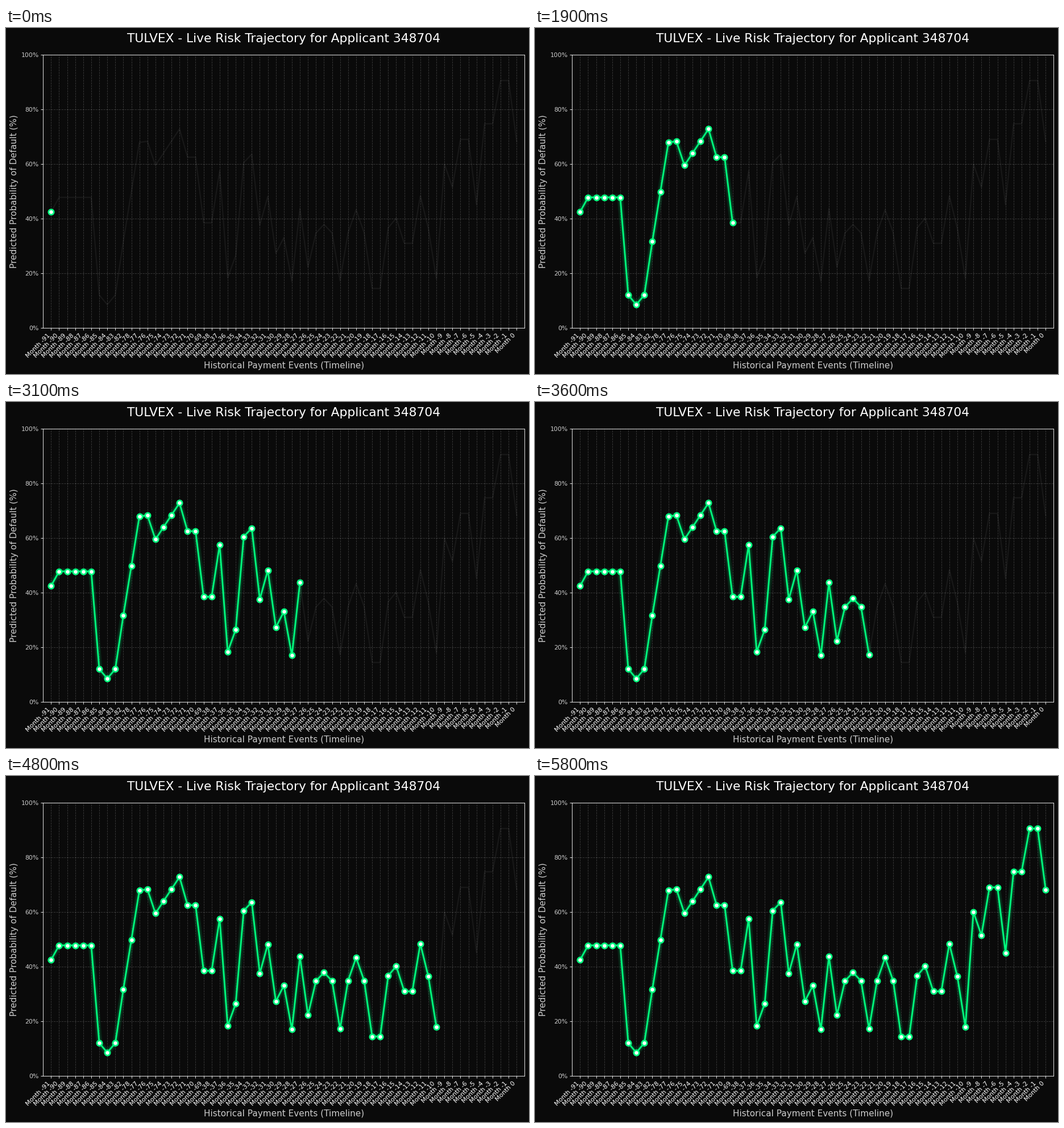
Recreate the animation shown at these times as a matplotlib script. Size 920 by 608 pixels, loop 5820 ms.

```python
import numpy as np
import matplotlib.pyplot as plt
from matplotlib.animation import FuncAnimation
from matplotlib.ticker import PercentFormatter

W, H, DPI = 920, 608, 80
K = 0.978  # scales nominal point sizes to the stage
LEFT, RIGHT, TOP, BOTTOM = 65.2, 912.4, 46.7, 527.4
BG, GREEN, GREY = "#0a0a0a", "#00ff7f", "#cccccc"
TICK_MS, HOLD, FRAMES = 20, 5, 291


def hold(level, n=2):
    return [level] * n


def ramp(start, end, n):
    return list(np.linspace(start, end, n))


def bump(base, tip):
    return [base, tip, base]


def zigzag(lows, highs):
    """Alternate between two trends, beginning and ending on the first."""
    out = np.empty(len(lows) + len(highs))
    out[::2], out[1::2] = lows, highs
    return list(out)


months = [*range(-91, -81), *range(-78, -68), *range(-38, 1)]
early = [42.5, *hold(47.8, 5), *bump(12.1, 8.6), *ramp(31.7, 67.9, 3),
         68.3, *ramp(59.5, 72.8, 4), *hold(62.5)]
middle = [*hold(38.5), 57.5, 18.4, 26.5, 60.5, 63.6,
          *zigzag(ramp(37.6, 17.1, 3), ramp(48.2, 33.1, 2)),
          43.7, 22.3, *bump(34.8, 37.9), 17.3, *bump(34.9, 43.3)]
late = [*hold(14.5), 36.7, 40.2, *hold(31), 48.4, 36.4, 18, 60, 51.5,
        *hold(69), 45.1, *hold(74.7), *hold(90.5), 68.2]
risk = np.array(early + middle + late)
x = np.arange(len(risk))

plt.style.use("dark_background")
plt.rcParams["font.family"] = "DejaVu Sans"
fig = plt.figure(figsize=(W / DPI, H / DPI), dpi=DPI, facecolor=BG)


def add_axes():
    ax = fig.add_axes([LEFT / W, 1 - BOTTOM / H,
                       (RIGHT - LEFT) / W, (BOTTOM - TOP) / H])
    ax.set(xlim=(-1, len(risk)), ylim=(0, 100), facecolor=BG)
    return ax


def draw_chart(ax):
    ax.set_title("TULVEX - Live Risk Trajectory for Applicant 348704",
                 fontsize=20 * K, pad=20 * K, color="white")
    label = dict(fontsize=14 * K, labelpad=4 * K, color=GREY)
    ax.set_xlabel("Historical Payment Events (Timeline)", **label)
    ax.set_ylabel("Predicted Probability of Default (%)", **label)
    ax.set_xticks(x, [f"Month {m}" for m in months], rotation=45, ha="right")
    ax.yaxis.set_major_formatter(PercentFormatter(decimals=0))
    ax.tick_params(labelsize=10 * K, length=3.5 * K, width=0.8 * K, pad=3.5 * K)
    ax.tick_params(axis="y", labelcolor=GREY)
    for spine in ax.spines.values():
        spine.set_linewidth(0.8 * K)
    ax.grid(True, ls="--", lw=0.8 * K, color="white", alpha=0.2)
    ax.plot(x, risk, color="white", lw=2 * K, alpha=0.06)


# The chart never changes, so it is rendered once and reused as a backdrop.
chart = add_axes()
draw_chart(chart)
fig.canvas.draw()
backdrop = np.array(fig.canvas.buffer_rgba())
chart.set_visible(False)
fig.figimage(backdrop, zorder=-1)

ax = add_axes()
ax.axis("off")
trail = [ax.plot([], [], color=GREEN, lw=lw * K, alpha=a)[0]
         for lw, a in ((10, 0.1), (6, 0.15))]
trail += ax.plot([], [], color=GREEN, lw=2.5 * K, marker="o", ms=8.5 * K,
                 mfc="white", mec=GREEN, mew=2.5 * K)


def update(i):
    n = min(i // HOLD, len(risk) - 1) + 1
    for line in trail:
        line.set_data(x[:n], risk[:n])
    return trail


anim = FuncAnimation(fig, update, frames=FRAMES, interval=TICK_MS,
                     repeat=True, repeat_delay=0)
plt.show()
```
